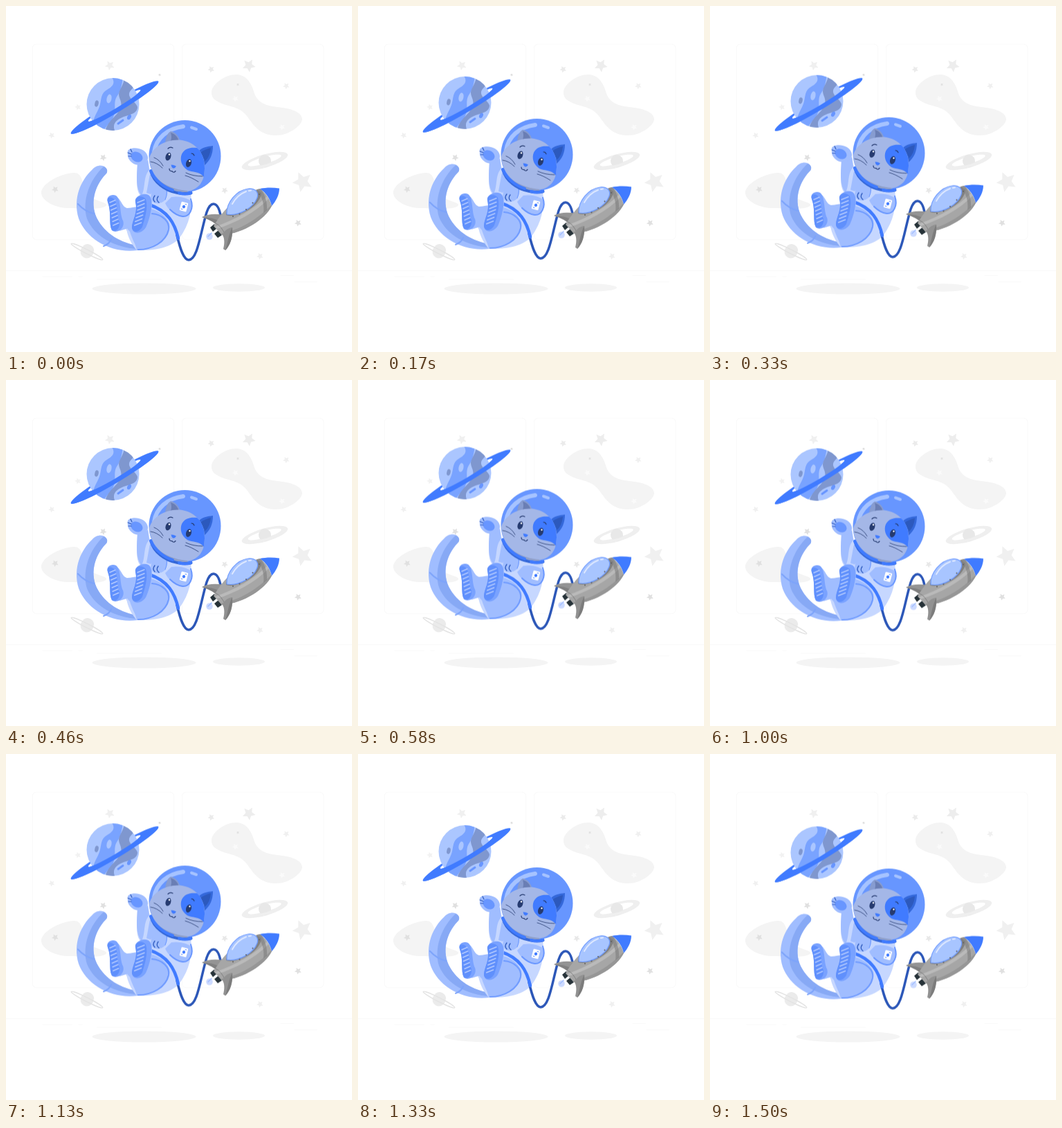
An HTML page for the animation above (1540 ms loop, 500 by 500 pixels).

```html
<!DOCTYPE html>
<html lang="en">
<head>
<meta charset="utf-8">
<title>Floating cat astronaut</title>
<style>
  html, body { margin: 0; width: 100%; height: 100%; overflow: hidden; background: #fff; }
  svg { display: block; width: 100vw; height: 100vh; }
  .line { fill: none; stroke-linecap: round; stroke-linejoin: round; }
  .hair { fill: none; stroke: #ebebeb; stroke-width: .3; }
  .blue { fill: #407bff; }
  .soft { fill: #a0bdff; }
  .pale { fill: #c6d7ff; }
  .mid { fill: #79a2ff; }
  .deep { fill: #2c59bd; }
  .ink { fill: #263b70; }
</style>
</head>
<body>
<svg viewBox="0 0 500 500" xmlns="http://www.w3.org/2000/svg">
  <defs>
    <clipPath id="globe"><circle cx="154.5" cy="142" r="38"/></clipPath>
    <clipPath id="front"><rect x="-80" y="-1" width="160" height="30"/></clipPath>
    <clipPath id="glass"><circle cx="258.5" cy="217" r="52"/></clipPath>
    <clipPath id="hull"><path d="M367 264C345 269 318 286 300 318L312 331C345 328 374 308 384 289C381 278 375 270 367 264Z"/></clipPath>
    <path id="ring" fill-rule="evenodd" d="M-73.5 0A73.5 8.5 0 0 1 73.5 0A73.5 8.5 0 0 1 -73.5 0ZM-43 -2.5A44 4.5 0 0 1 45 -2.5A44 4.5 0 0 1 -43 -2.5Z"/>
  </defs>

  <!-- room -->
  <g class="hair">
    <rect x="38.3" y="55.1" width="204.3" height="282.6" rx="5.6"/>
    <rect x="254.6" y="55.1" width="204.3" height="282.6" rx="5.6"/>
    <path d="M0 382.5H500M52.5 391H95.6M104.6 391H110.9M131.5 395.2H225.1M396.6 389.3H415.8M416.8 398.6H449.9"/>
  </g>
  <g fill="#f4f4f4">
    <ellipse cx="199.5" cy="408.5" rx="75" ry="8"/>
    <ellipse cx="336.5" cy="407" rx="37.5" ry="5.8"/>
    <path d="M297 124C298 113 316 99 333 99C348 100 354 111 358 123C362 139 374 144 392 146C414 148 428 154 428 164C427 173 409 187 390 187C370 187 361 177 351 163C342 149 332 147 318 143C304 139 296 133 297 124Z"/>
    <path d="M51 269C52 257 76 243 97 241C110 240 110 254 114 266C119 279 135 281 143 285C150 289 139 293 123 293C108 293 102 292 88 292C68 291 50 280 51 269Z"/>
  </g>
  <g transform="translate(374 224) rotate(-16)">
    <path fill="#efefef" fill-rule="evenodd" d="M-34.5 0A34.5 9.5 0 1 1 34.5 0A34.5 9.5 0 1 1 -34.5 0ZM-25 -1A25 5 0 1 0 25 -1A25 5 0 1 0 -25 -1Z"/>
    <circle r="9" fill="#e8e8e8"/>
    <path fill="#efefef" d="M-27 2Q0 8 27 2L25 6Q0 11 -25 6Z"/>
  </g>
  <g transform="translate(117 355) rotate(27)">
    <circle r="9.5" fill="#ebebeb"/>
    <ellipse rx="25.5" ry="2.8" fill="none" stroke="#e4e4e4" stroke-width="1.5"/>
    <path d="M-9 -4.5A9.5 9.5 0 0 1 9 -4.5Z" fill="#ebebeb"/>
  </g>
  <g id="stars"></g>

  <g id="float">
    <!-- planet, between the far and the near half of its ring -->
    <use href="#ring" class="blue" transform="translate(157 146.5) rotate(-30.8)"/>
    <g clip-path="url(#globe)">
      <rect x="116" y="103" width="78" height="78" fill="#abc6ff"/>
      <path fill="#79a3ff" d="M153 103C159 112 153 117 146 121C137 126 138 134 136 142C134 151 128 157 125 170L140 182C146 170 156 166 157 153C158 143 156 138 160 131C166 123 167 115 169 103Z"/>
      <path fill="#7f97cf" d="M170 104C172 112 164 119 163 127C163 134 168 137 166 146C163 158 147 164 143 182H158C152 170 160 164 170 160C181 157 190 154 190 146C188 139 180 136 178 129C177 122 184 120 186 114Z"/>
      <ellipse cx="149" cy="134" rx="3.5" ry="6.5" transform="rotate(12 149 134)" fill="#abc6ff"/>
      <ellipse cx="131" cy="141" rx="2.7" ry="4.7" transform="rotate(12 131 141)" fill="#7f97cf"/>
      <ellipse cx="178" cy="160.5" rx="2.6" ry="4" transform="rotate(28 178 160.5)" fill="#6795ff"/>
      <path class="line" stroke="#6795ff" stroke-width="3" d="M162 170L169 165"/>
    </g>
    <use href="#ring" class="blue" transform="translate(157 146.5) rotate(-30.8)" clip-path="url(#front)"/>

    <!-- tail -->
    <path class="soft" d="M124 237C133 226 148 230 146 241C131 256 120 281 131 306C143 330 168 343 190 346V353C152 358 116 337 105 307C96 277 109 251 124 237Z"/>
    <path fill="#87a9f5" d="M141 232C148 235 147 240 144 243C131 256 120 281 131 306C143 330 168 343 190 346V351C158 349 128 334 117 307C110 283 119 253 141 232Z"/>
    <g class="line" stroke="#7da4fb" stroke-width="2">
      <path d="M104 286Q114 297 127 300M141 347Q149 344 152 337"/>
    </g>

    <!-- raised arm -->
    <path class="pale" d="M190 226C197 230 202 228 205 222L208 238L224 263L207 280C194 279 189 270 189 255Z"/>
    <path class="soft" d="M190 227Q198 230 205 222L207 237C198 246 202 262 196 274C187 264 189 244 190 227Z"/>
    <path class="soft" d="M176 212C174 206 185 204 192 206C201 208 206 215 205 221C202 230 190 232 183 227C178 223 175 219 176 212Z"/>
    <ellipse cx="189" cy="218" rx="9" ry="7" transform="rotate(30 189 218)" fill="#6896ff"/>
    <path class="line" stroke="#2c59bd" stroke-width="1.2" d="M180 207L182 211M176 212L181 214M177 217L181 217"/>

    <!-- body -->
    <path class="pale" d="M208 244L267 269C270 295 265 315 251 335C239 349 214 354 190 353L177 320L200 278Z"/>
    <path class="soft" d="M208 243L222 258L209 272L203 270Z"/>
    <path class="soft" d="M190 290C170 292 165 302 170 315C175 328 186 340 189 353C218 353 240 335 236 314C230 300 215 291 190 290Z"/>
    <path class="line" stroke="#6f9bff" stroke-width="2" d="M211 300C226 301 237 312 235 323C231 341 211 352 191 352"/>
    <path class="pale" d="M180 292C171 300 166 312 179 326C183 339 188 345 189 353C183 346 178 338 175 327L171 305Z"/>

    <!-- cord -->
    <g class="line">
      <path stroke="#2c57b8" stroke-width="3.5" d="M247 331C252 352 257 367 264 367C277 367 281 327 290 298C296 281 306 282 310 302"/>
      <path stroke="#407bff" stroke-width="4.5" d="M207 287C234 296 244 314 249 336"/>
    </g>

    <!-- boots -->
    <path class="soft" d="M157 274C167 278 167 290 175 292L187 291V318L164 325Z"/>
    <path class="mid" d="M147 283C144 275 153 271 159 274C167 280 164 301 169 310C173 321 160 330 153 324C148 315 153 299 147 283Z"/>
    <path fill="#6090fc" d="M147 283C145 276 151 275 155 278C163 285 159 302 164 312C165 322 158 327 153 324C148 315 153 299 147 283Z"/>
    <path class="soft" d="M196 272C205 270 211 276 211 285C210 303 207 322 198 327L187 327Z"/>
    <path class="mid" d="M187 283C185 274 201 269 207 274C215 282 207 310 202 320C196 329 184 331 182 321C182 309 191 300 187 283Z"/>
    <path fill="#6090fc" d="M187 283C186 274 198 273 202 279C206 291 200 309 197 319C192 328 184 328 182 321C182 309 191 300 187 283Z"/>
    <g id="treads" class="line" stroke="#b5cbff" stroke-width="1.5"></g>

    <!-- near arm -->
    <path class="pale" d="M229 257C245 257 264 268 268 284C270 297 263 305 254 304C243 302 234 294 228 284Z"/>
    <path class="soft" d="M239 276C252 274 265 278 269 284C270 296 265 305 254 304C244 303 234 294 230 285Z"/>
    <path class="line" stroke="#6896ff" stroke-width="2" d="M267 279C272 293 265 305 255 304C248 303 242 299 237 294"/>
    <path class="soft" d="M229 257C235 262 234 274 230 280C225 287 212 287 210 279C207 269 218 257 229 257Z"/>
    <path class="line" stroke="#6896ff" stroke-width="1" d="M230 259Q235 269 230 280"/>
    <path class="line" stroke="#2c59bd" stroke-width="1.3" d="M215 283Q211 279 215 274M221 284Q216 280 220 275"/>
    <g transform="translate(257 290) rotate(15)">
      <rect x="-5" y="-6.5" width="10" height="13" rx="1.2" fill="#fff"/>
      <circle r="2.2" class="blue"/>
      <path class="line" stroke="#407bff" stroke-width=".8" d="M1 -4H3M-3 4H-1"/>
    </g>

    <!-- helmet -->
    <path class="line" stroke="#3467d8" stroke-width="5" d="M210 239C214 254 230 266 246 269Q257 272 267 270"/>
    <circle cx="258.5" cy="217" r="52" fill="#6796ff"/>
    <g clip-path="url(#glass)">
      <path class="line" stroke="#a6c3ff" stroke-width="6" d="M214 211C217 191 233 177 256 174"/>
      <path class="line" stroke="#a6c3ff" stroke-width="4" d="M268 175.5L275 178"/>
      <path fill="#879cd0" d="M230 205C229 194 233 183 238 181C245 182 250 188 252 197Z"/>
      <path fill="#6a7eb4" d="M238 183C245 185 249 190 250 197L235 201C239 195 240 189 238 183Z"/>
      <path fill="#3468da" d="M277 211C283 204 291 203 299 202C299 214 295 223 287 230Z"/>
      <path class="deep" d="M281 212C286 208 291 206 296 205Q295 217 288 224Z"/>
      <path fill="#a4b7e7" d="M207 220C211 204 232 191 255 194C276 198 288 215 287 235C287 253 279 267 258 268C233 268 208 246 207 220Z"/>
      <path class="blue" d="M276 205C284 212 287 223 287 235L286 247C279 238 270 241 262 237C253 231 251 221 254 214C258 206 266 204 276 205Z"/>
      <path fill="#8f9fc9" d="M208 236C218 254 238 265 262 267L263 270L240 270L210 248Z"/>
    </g>

    <!-- face -->
    <g class="ink">
      <ellipse cx="234.5" cy="217.5" rx="3.8" ry="6" transform="rotate(18 234.5 217.5)"/>
      <ellipse cx="264" cy="227" rx="3.8" ry="6" transform="rotate(18 264 227)"/>
    </g>
    <g fill="#fff">
      <circle cx="236" cy="214.5" r="1.2"/>
      <circle cx="265.5" cy="224" r="1.2"/>
    </g>
    <path class="blue" d="M238.500 229.500Q242 229 246 231.500Q244 235 241.500 234.500Q239 233 238.500 229.500Z"/>
    <g class="line" stroke="#263b70">
      <path stroke-width="1.2" d="M236 235Q236 239 240 238.500Q242 242 245 238.500M234 206Q237 203 241 205M268 213Q271 213 272 216"/>
      <path stroke-width=".8" d="M227 231Q222 222 214 219M226 234Q218 226 209 225M260 241Q270 246 284 246M259 245Q267 247 278 254"/>
    </g>
    <path class="line" stroke="#407bff" stroke-width="4" d="M209 238C214 251 228 262 241 266"/>
    <path class="line" stroke="#407bff" stroke-width="4" d="M250 270Q259 273 267 270"/>

    <!-- rocket -->
    <circle cx="294" cy="333" r="4.8" fill="#ccdaff"/>
    <path class="line" stroke="#a0bdff" stroke-width="1.5" d="M292 333L297 328"/>
    <path fill="#263238" d="M295 320L301 315L305 321L299 326ZM301 329L307 324L312 331L306 335Z"/>
    <path fill="#949494" d="M283 305C292 300 304 300 315 302L305 317C299 311 291 308 283 305Z"/>
    <path fill="#808080" d="M283 305Q298 305 309 311L305 317Q298 309 283 305Z"/>
    <g clip-path="url(#hull)">
      <rect x="296" y="260" width="92" height="75" fill="#a6a6a6"/>
      <path fill="#bababa" d="M302 319C332 308 358 294 378 274L380 278C360 299 332 313 305 322Z"/>
      <path fill="#969696" d="M309 329C339 324 365 307 385 286L390 298L320 336Z"/>
      <path fill="#777" d="M361 264L367 262C373 271 378 281 377 295L372 299C374 285 369 273 361 264Z" opacity=".5"/>
      <path class="line" stroke="#808080" stroke-width="1" d="M303 314Q311 317 317 331"/>
    </g>
    <path fill="#919191" d="M313 331C315 326 319 321 327 320C328 334 324 346 317 353L314 351C316 343 316 336 313 331Z"/>
    <path fill="#7c7c7c" d="M327 320C328 334 324 346 317 353C321 340 322 329 327 320Z"/>
    <path class="blue" d="M367 264C376 262 386 262 395 263.5C395 273 390 282 384 289C382 279 376 270 367 264Z"/>
    <path fill="#808080" d="M318 302C333 307 368 290 369 270L363 266L318 299Z"/>
    <path fill="#a8c5ff" stroke="#6f9bff" stroke-width="1.2" d="M319 301C318 284 333 266 350 264C359 263 366 268 363 277C358 291 337 304 319 301Z"/>
    <path class="line" stroke="#dfe9ff" stroke-width="2" d="M327 286Q334 273 347 268M351 267L354 266.5"/>
    <g fill="#5f5f5f" id="rivets"></g>
  </g>
</svg>
<script>
const NS = 'http://www.w3.org/2000/svg';
const $ = id => document.getElementById(id);

function add(parent, tag, attrs) {
  const el = document.createElementNS(NS, tag);
  for (const key in attrs) el.setAttribute(key, attrs[key]);
  parent.append(el);
}

function star(x, y, r, fill, turn = 0) {
  const pts = Array.from({ length: 10 }, (_, i) => {
    const a = (i * 36 + turn - 54) * Math.PI / 180;
    const d = i % 2 ? r * .48 : r;
    return `${(x + d * Math.cos(a)).toFixed(1)},${(y + d * Math.sin(a)).toFixed(1)}`;
  });
  add($('stars'), 'polygon', { points: pts.join(' '), fill });
}

star(150, 86, 7.2, '#f0f0f0', 8);
star(104, 146, 4.7, '#f2f2f2', 20);
star(66, 187, 4.7, '#f0f0f0', 10);
star(222, 99.5, 2.3, '#dedede', 5);
star(140.5, 219, 5.2, '#e0e0e0', -8);
star(71, 265, 5.2, '#e0e0e0', 8);
star(296.5, 91.5, 5, '#ebebeb', 10);
star(351, 86, 9.8, '#ededed', -6);
star(405, 115.5, 5, '#f0f0f0', 5);
star(335, 113.5, 2.3, '#e0e0e0');
star(331.5, 134, 4.7, '#fafafa', 10);
star(399, 175, 4.7, '#fafafa', 10);
star(428.5, 254, 15, '#f0f0f0', 12);
star(422, 313.5, 5.2, '#e0e0e0', 8);
star(367, 361.5, 5, '#f0f0f0', 10);
star(316, 266.5, 5, '#e8e8e8', -5);

for (let i = 0; i < 7; i++) {
  const y = 284 + i * 5.5;
  add($('treads'), 'path', { d: `M${150 + i * .8} ${y}l8 -3.5` });
  add($('treads'), 'path', { d: `M${190 - Math.max(0, i - 2) * 1.1} ${y}l10 -4` });
}

for (let i = 0; i < 5; i++) {
  const u = i / 4;
  add($('rivets'), 'circle', { cx: 328 + 38 * u, cy: 304 - 8 * u - 24 * u * u, r: 1 });
}

// Starts a little after the lowest point and drifts at constant speed.
$('float').animate(
  [.8, -9.2, .8].map(y => ({ transform: `translateY(${y}px)` })),
  { duration: 1540, delay: -60, iterations: Infinity, easing: 'linear' }
);
</script>
</body>
</html>
```
